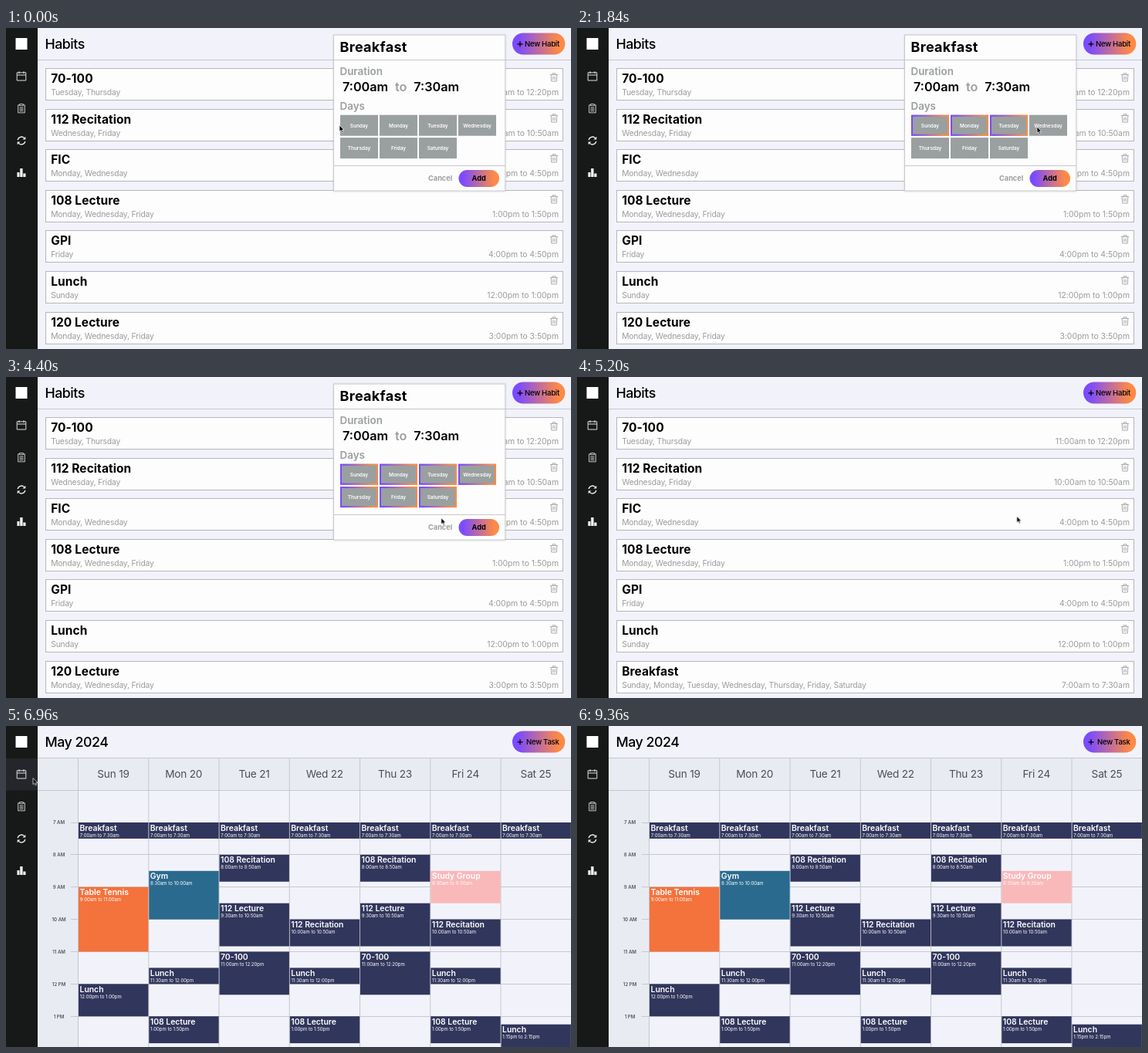
Write an HTML page that moves like this. It is 732 px wide and 416 px high and loops after 9.44 s.

```html
<!DOCTYPE html>
<html lang="en">
<head>
<meta charset="utf-8">
<title>Habits</title>
<style>
html, body { margin: 0; width: 100%; height: 100%; overflow: hidden; background: #f2f3fa; }
svg { display: block; }
text { font-family: Inter, "Open Sans", sans-serif; }
.head { font-size: 17.8px; font-weight: 500; letter-spacing: -.5px; }
.name { font-size: 15.5px; font-weight: 700; letter-spacing: .07px; }
.title { font-size: 18px; font-weight: 700; letter-spacing: .3px; }
.days { font-size: 10.3px; letter-spacing: -.15px; fill: #9b9b9e; }
.time { font-size: 10.4px; letter-spacing: -.03px; fill: #9b9b9e; text-anchor: end; }
.btn { font-size: 9.6px; font-weight: 500; letter-spacing: -.28px; }
.label { font-size: 13.4px; font-weight: 600; fill: #9b9fa0; }
.clock { font-size: 16.2px; font-weight: 600; }
.day { font-size: 6.4px; font-weight: 600; fill: #fff; text-anchor: middle; }
.small { font-size: 9.2px; font-weight: 700; }
.col { font-size: 13.6px; letter-spacing: -.2px; fill: #4c4e54; text-anchor: middle; }
.hour { font-size: 6.1px; font-weight: 600; fill: #55575c; text-anchor: middle; }
.event { font-size: 10.4px; font-weight: 600; fill: #fff; }
.span { font-size: 6px; fill: #fff; }
.card { fill: #fdfdfd; stroke: #b6b6bb; }
.rule { stroke: #c6c7cf; }
.line { fill: none; stroke: #f4f4f4; stroke-width: .9; }
</style>
</head>
<body>
<svg id="stage" width="732" height="416" viewBox="0 0 732 416">
  <defs>
    <linearGradient id="glow">
      <stop offset=".1" stop-color="#7a4bff"/>
      <stop offset=".88" stop-color="#ff8a45"/>
    </linearGradient>
    <filter id="shade" x="-5%" y="-5%" width="110%" height="110%">
      <feDropShadow dx="0" dy=".5" stdDeviation="1" flood-opacity=".14"/>
    </filter>
    <g id="trash" fill="none" stroke="#a3a3a6" stroke-width=".9">
      <path d="M-4.9 -3.5H4.9M-2 -3.5V-5.2H2V-3.5M-3.8 -3.5L-3.3 5H3.3L3.8 -3.5"/>
      <path d="M-1.6 -1.4V3.1M0 -1.4V3.1M1.6 -1.4V3.1" stroke-width=".7"/>
    </g>
  </defs>

  <rect width="732" height="416" fill="#f2f3fa"/>
  <g id="habits"></g>
  <g id="calendar"></g>

  <g id="sidebar">
    <rect width="41" height="416" fill="#171918"/>
    <rect id="hover" y="42" width="41" height="41.5" fill="#24262b"/>
    <rect x="12.5" y="13" width="15" height="15" fill="#fff"/>
    <g class="line">
      <path d="M14.2 57.8H25.8V68H14.2ZM14.2 61H25.8M17 56.2V59.2M23 56.2V59.2"/>
      <path d="M17.7 99.8H15.7V109.8H24.3V99.8H22.3M17.7 98.6H22.3V100.8H17.7ZM17.5 103.4H22.5M17.5 105.4H22.5M17.5 107.4H22.5" stroke-width=".8"/>
      <path d="M15.2 145.2A4.9 4.9 0 0 1 23.6 142.6M24.8 146.8A4.9 4.9 0 0 1 16.4 149.4" stroke-width="1.3"/>
    </g>
    <path d="M25.3 140.8V144.6H21.5ZM14.7 151.2V147.4H18.5ZM14.4 187H17.5V193H14.4ZM18.2 182H21.6V193H18.2ZM22.3 188.5H25.5V193H22.3Z" fill="#f4f4f4"/>
  </g>

  <path id="cursor" d="M0 0V8.2L1.9 6.5L3.2 9.3L4.6 8.7L3.4 6H6Z" stroke="#fff" stroke-width=".7"/>
</svg>
<script>
const LOOP = 9440, STEP = 80, CLOSE = 4960, SWITCH = 6960;
const WEEK = ["Sunday", "Monday", "Tuesday", "Wednesday", "Thursday", "Friday", "Saturday"];
const NAVY = "#31365c";
const $ = id => document.getElementById(id);

const text = (cls, x, y, s, extra = "") => `<text class="${cls}" x="${x}" y="${y}" ${extra}>${s}</text>`;
const rect = (x, y, w, h, extra) => `<rect x="${x}" y="${y}" width="${w}" height="${h}" ${extra}/>`;
const rule = d => `<path class="rule" fill="none" d="${d}"/>`;

function clock(h) {
  const m = Math.round(h % 1 * 60);
  return `${(Math.floor(h) + 11) % 12 + 1}:${String(m).padStart(2, "0")}${h < 12 ? "am" : "pm"}`;
}
const span = (a, b) => `${clock(a)} to ${clock(b)}`;

function header(title, action, x) {
  return rule("M41 41.5H732") + text("head", 50.5, 27, title) +
    rect(656, 6.5, 68.3, 28, 'rx="14" fill="url(#glow)"') +
    '<path d="M662.5 20.8H669.5M666 17.3V24.3" stroke="#000" stroke-width="1.3"/>' +
    text("btn", x, 24.3, action);
}

// Habits page
const MWF = "Monday, Wednesday, Friday";
const habits = [
  ["70-100", "Tuesday, Thursday", 11, 12 + 1 / 3],
  ["112 Recitation", "Wednesday, Friday", 10, 10 + 5 / 6],
  ["FIC", "Monday, Wednesday", 16, 16 + 5 / 6],
  ["108 Lecture", MWF, 13, 13 + 5 / 6],
  ["GPI", "Friday", 16, 16 + 5 / 6],
  ["Lunch", "Sunday", 12, 13]
];

function card([name, days, a, b], i, id = "") {
  return `<g ${id && `id="${id}"`} transform="translate(0 ${Math.round(i * 52.6)})">` +
    rect(51.5, 52.5, 670, 41, 'class="card"') +
    text("name", 58.2, 71, name) + text("days", 58.2, 86.6, days) +
    text("time", 716, 86.6, span(a, b)) + '<use href="#trash" x="710" y="64"/></g>';
}

function dayButton(day, i) {
  const x = 433 + i % 4 * 51, y = 112.7 + Math.floor(i / 4) * 29.4;
  return rect(x, y, 49, 27, 'fill="#9a9fa0"') +
    rect(x + 1, y + 1, 47, 25, `id="pick${i}" fill="none" stroke="url(#glow)" stroke-width="2"`) +
    text("day", x + 24.5, y + 15.8, day);
}

const modal = '<g id="modal">' +
  rect(424.5, 9, 222.3, 202, 'fill="#fdfdfd" stroke="#c8c8ce" filter="url(#shade)"') +
  rule("M424.5 41.5H647M424.5 178.5H647") +
  text("title", 432.5, 31, "Breakfast") +
  text("label", 432.5, 61, "Duration") + text("label", 432.5, 106, "Days") +
  text("clock", 436, 82, "7:00am") + text("clock", 504, 82, "to", 'fill="#9b9fa0"') +
  text("clock", 528.3, 82, "7:30am") +
  WEEK.map(dayButton).join("") +
  text("small", 547, 198.3, "Cancel", 'fill="#9b9fa0"') +
  rect(586.5, 184, 52.5, 22, 'rx="11" fill="url(#glow)"') +
  text("small", 603.5, 198.3, "Add") + "</g>";

$("habits").innerHTML = header("Habits", "New Habit", 672) +
  habits.map((h, i) => card(h, i)).join("") +
  card(["120 Lecture", MWF, 15, 15 + 5 / 6], 6, "before") +
  card(["Breakfast", WEEK.join(", "), 7, 7.5], 6, "after") + modal;

// Calendar page: [name, day columns, start, end, colour]
const events = [
  ["Breakfast", [0, 1, 2, 3, 4, 5, 6], 7, 7.5],
  ["Table Tennis", [0], 9, 11, "#f4723c"],
  ["Lunch", [0], 12, 13],
  ["Gym", [1], 8.5, 10, "#2a6a8f"],
  ["Lunch", [1, 3, 5], 11.5, 12],
  ["108 Lecture", [1, 3, 5], 13, 13 + 5 / 6],
  ["108 Recitation", [2, 4], 8, 8 + 5 / 6],
  ["112 Lecture", [2, 4], 9.5, 10 + 5 / 6],
  ["70-100", [2, 4], 11, 12 + 1 / 3],
  ["112 Recitation", [3, 5], 10, 10 + 5 / 6],
  ["Study Group", [5], 8.5, 9.5, "#f9b8b9"],
  ["Lunch", [6], 13.25, 14.25]
];
const colX = i => 93.5 + i * 91.25;
const hourY = h => 125 + (h - 7) * 41.87;

function block([name, cols, a, b, fill = NAVY]) {
  const y = hourY(a);
  return cols.map(c => {
    const x = colX(c);
    return rect(x + .5, y, 90.4, hourY(b) - y, `fill="${fill}"`) +
      text("event", x + 2, y + 10.6, name) + text("span", x + 2.3, y + 18.6, span(a, b));
  }).join("");
}

let grid = rect(41, 42, 691, 41.5, 'fill="#e9ebf3"') + rect(41, 83, 52.5, 333, 'fill="#e9ebf3"') +
  rule("M41 83.5H732");
for (let h = 7; h <= 13; h++) {
  const y = hourY(h);
  grid += rule(`M84 ${Math.floor(y) + .5}H732`) +
    text("hour", 68.6, y + 2.3, `${(h + 11) % 12 + 1} ${h < 12 ? "AM" : "PM"}`);
}
WEEK.forEach((day, i) => {
  grid += rule(`M${colX(i)} 42V416`) + text("col", colX(i) + 45.5, 67.4, `${day.slice(0, 3)} ${19 + i}`);
});
$("calendar").innerHTML = header("May 2024", "New Task", 674) + grid + events.map(block).join("");

// Motion, timed in ms
const style = document.createElement("style");
const at = t => (Math.max(0, t - 4) / LOOP * 100).toFixed(4) + "%";

function animate(id, frames) {
  style.textContent += `@keyframes ${id}{${frames}}#${id}{animation:${id} ${LOOP}ms step-end infinite}\n`;
}
function show(id, from, to = LOOP) {
  const start = from > 0 ? `0%{opacity:0}${at(from)}{opacity:1}` : "0%{opacity:1}";
  const end = to < LOOP ? `${at(to)}{opacity:0}100%{opacity:0}` : "100%{opacity:1}";
  animate(id, start + end);
}

show("habits", 0, SWITCH);
show("calendar", SWITCH);
show("modal", 0, CLOSE);
show("before", 0, CLOSE);
show("after", CLOSE);
show("hover", 6320, 8240);
[480, 960, 1440, 2000, 3920, 3200, 2640].forEach((t, i) => show("pick" + i, t));

const path = [
  [0, 432, 126], [240, 446, 127], [560, 450, 127], [880, 500, 128], [1040, 503, 128],
  [1360, 552, 129], [1520, 555, 128], [1840, 596, 128], [1920, 603, 130], [2160, 604, 131],
  [2560, 556, 152], [2800, 552, 153], [3120, 504, 150], [3280, 499, 150], [3680, 460, 153],
  [4000, 458, 154], [4560, 606, 194], [4960, 604, 194], [5200, 569.7, 180.5], [5520, 330, 120],
  [5840, 80, 78], [5920, 66, 76], [6080, 66, 76], [6320, 38, 70], [6480, 35, 67.5],
  [7200, 35, 67.5], [7600, 30, 60], [8000, 28, 58], [8400, 26, 10], [8560, 26, -14], [LOOP, 26, -14]
];
animate("cursor", path.map(([t, x, y], i) => {
  const n = i + 1 < path.length ? (path[i + 1][0] - t) / STEP : 1;
  return `${t === LOOP ? "100%" : at(t)}{transform:translate(${x}px,${y}px);animation-timing-function:steps(${n})}`;
}).join(""));
document.head.append(style);
</script>
</body>
</html>
```
